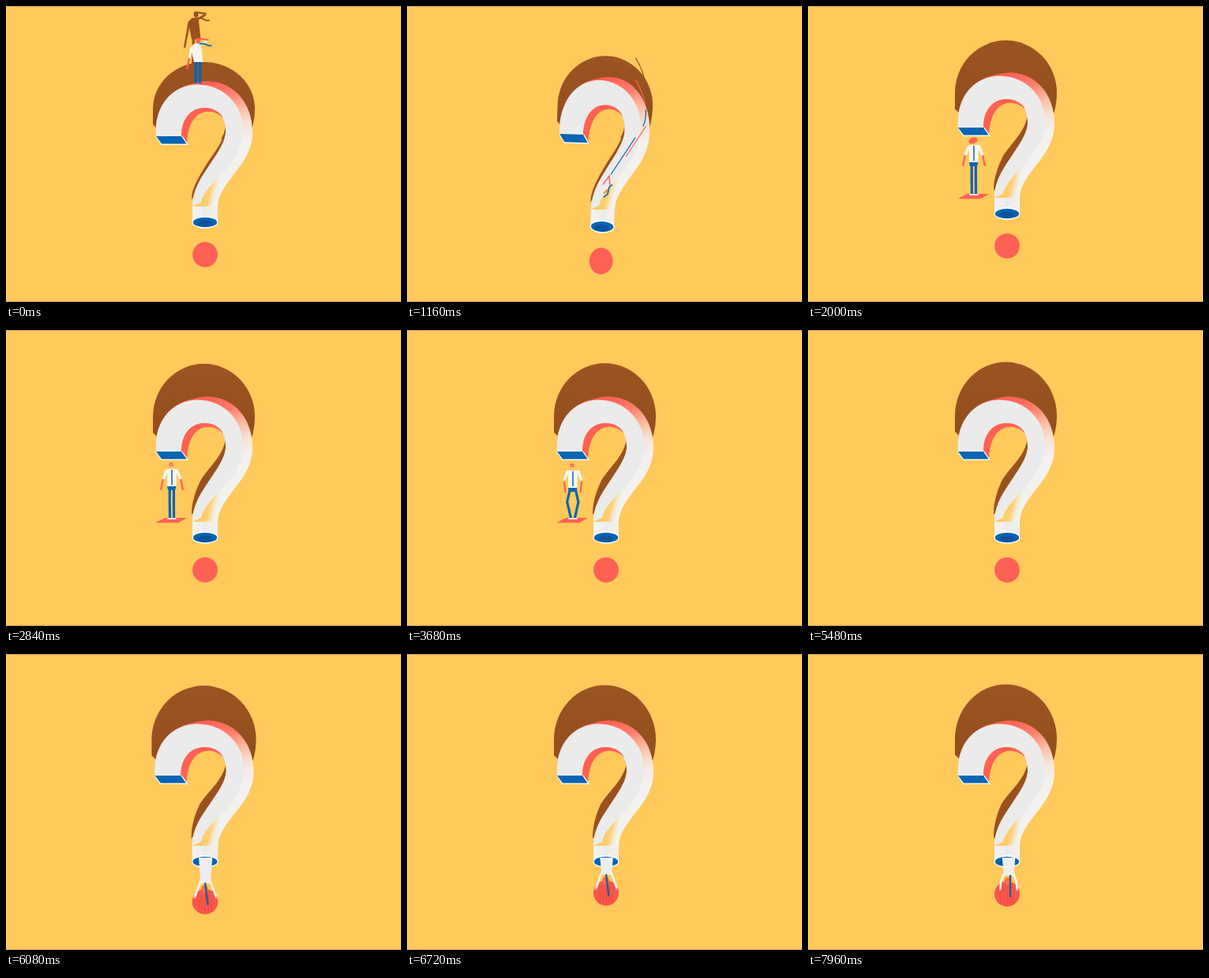
An HTML page with a canvas that plays this animation: 500x375 px, repeating every 8000 ms.

```html
<!DOCTYPE html>
<html lang="en">
<head>
<meta charset="utf-8">
<title>Question mark</title>
<style>
html, body { margin: 0; width: 100%; height: 100%; overflow: hidden; background: #ffc95b; }
canvas { display: block; width: 100vw; height: 100vh; }
</style>
</head>
<body>
<canvas id="stage" width="500" height="375"></canvas>
<script>
const ctx = document.getElementById('stage').getContext('2d');
const LOOP = 8000;
const YELLOW = '#ffc95b', RED = '#ff6155', BLUE = '#0765b4', FACE = '#ebebeb', WHITE = '#f7f5f1', BROWN = '#99521f';

// Timing rules
const clamp = v => Math.max(0, Math.min(1, v));
const mix = (a, b, k) => a + (b - a) * k;
const progress = (t, from, to) => clamp((t - from) / (to - from));
const ease = (t, from, to) => { const p = progress(t, from, to); return p * p * (3 - 2 * p); };
const bump = (t, from, to) => Math.sin(Math.PI * progress(t, from, to));
const spring = (t, start, half, decay) =>
  t < start ? 0 : Math.exp((start - t) / decay) * Math.sin(Math.PI * (t - start) / half);

// Drawing helpers
function gradient(x0, y0, x1, y1, ...colors) {
  const g = ctx.createLinearGradient(x0, y0, x1, y1);
  colors.forEach((color, i) => g.addColorStop(i / (colors.length - 1), color));
  return g;
}
function fill(path, color) {
  ctx.fillStyle = color;
  ctx.fill(new Path2D(path));
}
function curve(path, color, width) {
  ctx.strokeStyle = color;
  ctx.lineWidth = width;
  ctx.stroke(new Path2D(path));
}
function oval(x, y, rx, ry, color, turn = 0) {
  ctx.beginPath();
  ctx.ellipse(x, y, rx, ry, turn, 0, 7);
  ctx.fillStyle = color;
  ctx.fill();
}
function isolated(draw) {
  ctx.save();
  draw();
  ctx.restore();
}

// Outlines of the mark at rest
const HOLE = 'C278 130 267 118 251 118 C234 118 222 132 222 154';
const STEM = 'C236 226 243 212 254 196 C268 175 279 160 278 146';
const SIDE = 'M190 154 C187 118 208 92 238 87 C246 85 252 84 258 84.5 C290 86 312 114 312 148 ' +
  `C312 176 296 192 284 208 C273 223 268 232 268 245 H236 ${STEM} ${HOLE}Z`;
const FRONT = 'M190 154 C187 116 210 88.5 243 88.5 C276 89 300 114 300 146 ' +
  `C300 168 288 184 276 199 C262 213 249 226 247 238 L236 243 ${STEM} ${HOLE}Z`;

function placeMark(t) {
  const leap = bump(t, 820, 1660), hop = bump(t, 3820, 4180);
  const top = 96 - 11 * ease(t, 860, 1460) - 4 * spring(t, 1500, 160, 150) - 3 * hop;
  ctx.translate(252, top);
  ctx.transform(1, .033 * leap, -.035 * leap, 1, 1.5 * leap, 0);
  ctx.scale(1 - .07 * leap + .025 * bump(t, 5900, 6260), 1 + .065 * leap + .02 * hop);
  ctx.translate(-252, -85);
}

function drawShadow(t) {
  const top = 60 - 16.5 * ease(t, 1100, 1700) - 5 * progress(t, 2000, 7960) - 10 * bump(t, 3780, 4180);
  const bottom = 130 + (top - 43) * .53, center = bottom - 20;
  fill(`M186 ${bottom} V${center} A64.5 ${center - top} 0 0 1 315 ${center} Q315 ${bottom} 306 ${bottom + 20} ` +
    `L200 ${bottom + 14}Z`, gradient(0, top, 0, bottom, '#9d5423', '#944e1d'));
  fill(`M278 146 ${HOLE} L222 200 L240 222Z`, YELLOW);
  const shift = 4 + (60 - top) * .4;
  fill(`M278 138 C${278 - shift / 3} 160 ${270 - shift} 171 ${257.5 - shift} 190 ` +
    `C${246 - shift * .7} 207 235 220 235 234 L280 180Z`, BROWN);
}

function drawMark() {
  fill(SIDE, gradient(262, 84, 290, 165, RED, '#ff7c6c', '#fbb99f', '#f7e3d3', '#f3f2ef'));
  fill('M284 172 C266 204 248 222 247 236 L236 243 H268 C268 232 273 223 284 208Z',
    gradient(247, 232, 265, 236.5, YELLOW, '#fdd078', '#f9e2b400'));
  fill(FRONT, FACE);
  fill('M222 154 C222 132 234 118 251 118 C262 118 270 122 275 131 C268 124 260 122 254 123 C240 124 230 138 229 164Z', RED);
  curve('M222.5 154 L229.5 164.2 H197 L190 154', '#ffffff', 1.6);
  fill('M190 154 H222 L228.5 163.5 H197Z', BLUE);
  fill('M236 243 H268 V263 A16 7.6 0 0 1 236 263Z', gradient(236, 0, 268, 0, '#f4f4f4', '#ededed', '#f3f1ed'));
  curve('M252 244 V255', '#e2e2e2', .7);
  oval(252, 263, 16.4, 7.8, '#ffffff');
  oval(252, 263, 15.2, 6.2, BLUE);
  oval(252, 264.5, 10, 4, '#0a549e');
}

function drawDot(t, drop) {
  oval(252, 304 + drop, 15.9, 15.9, RED);
  isolated(() => {
    ctx.globalAlpha = progress(t, 5700, 5800);
    ctx.translate(252, 304 + drop);
    oval(0, 0, 15.7, 15.7, '#f9574b');
    for (let x = -12; x <= 12; x += 6) curve(`M${x} -9 Q${x * .4} 1 ${x * .7} 13`, '#de483f', .8);
  });
}

// Torso and arms reaching from the tube down to the dot.
function drawHanging(t, drop) {
  if (t < 5560) return;
  const reach = progress(t, 5560, 5740), grip = ease(t, 6900, 7250);
  const shoulder = mix(262, 281 + drop, reach);
  isolated(() => {
    ctx.beginPath();
    ctx.rect(225, 258, 55, 90);
    ctx.clip();
    ctx.translate(252.5 + 1.5 * grip, 0);
    ctx.globalAlpha = progress(reach, .5, .7);
    oval(-1, 288 + drop, 4.2, 5, '#ff6d50');
    for (const s of [-1, 1]) {
      const hand = s * mix(13.5, 10.5, grip);
      curve(`M${s * 6} ${shoulder - 3} L${s * 10} ${shoulder + 8} L${hand} ${shoulder + 18}`, '#f9f3ef', 2.6);
      oval(hand, shoulder + 18, 1.6, 1.6, '#ff8e80');
    }
    ctx.globalAlpha = 1;
    fill(`M-8.5 256 H8.5 L6.5 ${shoulder} H-6Z`, '#eeeeee');
    if (reach > .8) curve(`M${mix(-.5, 2, grip)} ${shoulder - 1} L${3 - grip} ${308 + drop}`, '#285f8f', 2.4);
  });
}

function lookout(t, shade) {
  if (t > 1010) return;
  const c = color => shade || color;
  const p = ease(t, 720, 1010), wave = 1.4 * Math.sin(t / 80);
  isolated(() => {
    if (shade) ctx.transform(1, 0, 0, 1.16, -3, -40);
    ctx.translate(242.5 + 48 * p, 98 + 18 * p - 24 * Math.sin(Math.PI * p));
    ctx.rotate(.6 * p);
    for (const x of [-2, 3.5]) curve(`M${x} -28 L${x - .5} 0`, c(BLUE), 3.6);
    curve('M-8 -45 L-10.5 -31', c(WHITE), 2.6);
    curve('M-10.5 -32 L-13.5 -18', c(RED), 2.4);
    oval(1, -54.5, 3, 3.2, c(RED));
    fill('M-9 -46 L-4 -50.5 L4 -51 L7 -27 H-4.5Z', c(WHITE));
    curve('M4 -49.5 L13 -54', c(WHITE), 2.4);
    curve('M14 -55 L3 -56.5', c(RED), 2);
    curve(`M2 -50 Q8 ${-51 - wave} 11 ${-49 + wave} T18 ${-48 - wave}`, c(BLUE), 1.6);
  });
}

// Speed lines running down the stem, followed by the tumbling figure.
const TRACK = 'M289 93 Q308 125 300 150 L257 215 L250 278';

function slide(t) {
  if (t < 1000 || t > 1330) return;
  const dt = t - 1160;
  const streak = (color, start, length, dx, dy) => isolated(() => {
    ctx.translate(dx, dy);
    ctx.setLineDash([length, 999]);
    ctx.lineDashOffset = -start - dt * .6;
    curve(TRACK, color, 1.2);
  });
  streak(BROWN, 0, 36, 0, -28);
  streak(RED, 0, 34, 0, 0);
  streak(RED, 62, 46, 4, 0);
  streak(BLUE, 40, 22, 0, 0);
  streak(BLUE, 79, 56, 0, 0);
  isolated(() => {
    ctx.translate(252 - dt * (dt < 0 ? .3 : .04), 228 + dt * .4);
    curve('M-4 -2 L4 -13 L5 -1', RED, 1.5);
    curve('M-3 9 L1 5 L3 8', '#f58a3c', 2);
    curve('M-3 14 L2 10 L4 1 L8 -2', BLUE, 1.6);
  });
}

// Upright figure with feet at the origin; bend runs from straight legs to bowed ones.
function drawPerson(bend, shake, swing) {
  for (const s of [-1, 1]) {
    const foot = 1 + s * 2.5, hip = .8 + s * 2.6, elbow = 1 + s * 11;
    curve(`M${hip} -41 L${hip + s * 4.5 * bend} -21 L${foot} -1`, BLUE, 3.2);
    curve(`M${foot - 3} 0 H${foot + 3}`, WHITE, 1.8);
    curve(`M${elbow} ${mix(-51, -47, bend)} L${1 + s * mix(14, 9.5, bend)} ${mix(-36, -33, bend)}`, RED, 2.2);
    curve(`M${1 + s * 6} ${bend - 62} L${elbow} ${bend - 50}`, WHITE, 3.6);
  }
  isolated(() => {
    ctx.translate(1, 2 * bend);
    fill('M-6 -63 H6 L5.5 -41 H-6Z', WHITE);
    curve('M0 -62 V-43', BLUE, 1.5);
    fill('M-6 -41 H5.5 L4 -36 H-5Z', BLUE);
  });
  oval(swing, bend - 68.5, 2.5 + 3.4 * shake, 2.6 + shake, RED, -.35 * shake);
  oval(0, bend - 68, 1 - shake, 1 - shake, '#ffb39a');
}

function visitor(t) {
  if (t < 1380 || t > 4150) return;
  const arrive = ease(t, 1380, 1740), matIn = ease(t, 1560, 1720), matSize = matIn - ease(t, 3960, 4140);
  isolated(() => {
    ctx.translate(209.5 - 30 * (1 - matIn), 241);
    ctx.scale(matSize, matSize);
    fill('M-20 3.3 L-8.5 -3 H19.5 L9 3.3Z', RED);
  });
  if (t > 3960) return;
  const shake = 1 - ease(t, 2400, 2600);
  const bend = ease(t, 3300, 3680) - ease(t, 3750, 3850);
  isolated(() => {
    ctx.beginPath();
    ctx.rect(150, 159, 120, 170);
    ctx.clip();
    ctx.translate(209 + 43 * (1 - arrive) - 30 * Math.sin(Math.PI * arrive),
      239 + 50 * (1 - arrive) - 88 * ease(t, 3780, 3960));
    ctx.rotate(1.2 * (arrive - 1));
    ctx.scale(mix(.3, 1, arrive), mix(.3, 1, arrive));
    drawPerson(bend, shake, shake * Math.sin((t - 2000) / 70));
  });
}

function draw(t) {
  ctx.fillStyle = YELLOW;
  ctx.fillRect(0, 0, 500, 375);
  ctx.fillStyle = '#d1a04c';
  for (const y of [0, 374]) ctx.fillRect(0, y, 500, 1);

  const drop = 50 * spring(t, 5640, 650, 300);
  lookout(t, BROWN);
  isolated(() => {
    placeMark(t);
    drawShadow(t);
    drawMark();
    drawDot(t, drop);
    drawHanging(t, drop);
  });
  lookout(t);
  slide(t);
  visitor(t);
}

function tick() {
  draw(performance.now() % LOOP);
  requestAnimationFrame(tick);
}
tick();
</script>
</body>
</html>
```
